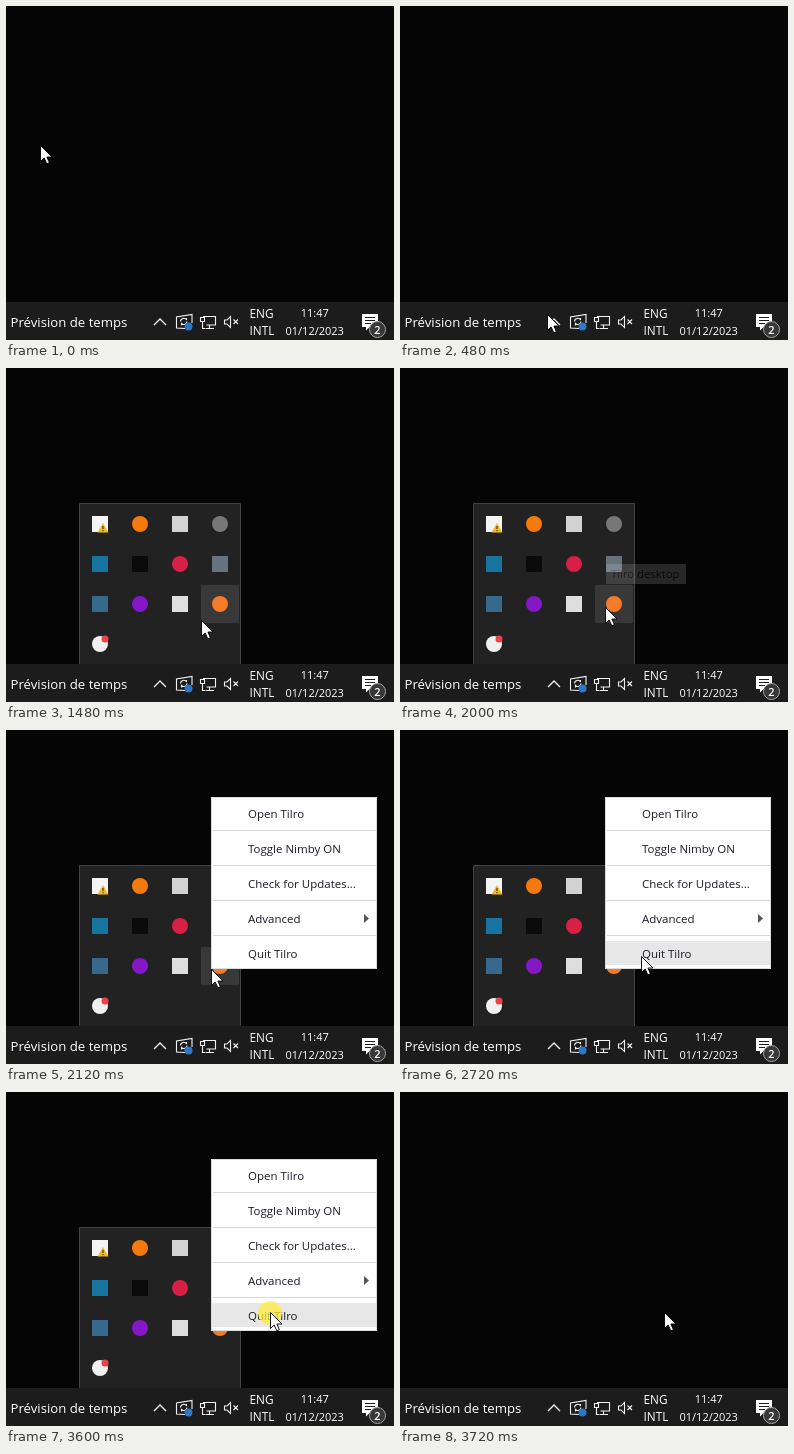
Recreate the animation shown at these times as an HTML page. Size 388 px wide and 334 px high, loop 3.88 s.

```html
<!DOCTYPE html>
<html lang="fr">
<head>
<meta charset="utf-8">
<title>Tray menu</title>
<style>
  html, body { margin: 0; width: 100%; height: 100%; overflow: hidden; background: #050505; }
  svg { display: block; width: 388px; height: 334px; font-family: "Open Sans", "Noto Sans", sans-serif; }
  .bar text { fill: #fff; font-weight: 500; }
  .glyph { fill: none; stroke: #f2f2f2; stroke-width: 1.1; }
  #menu text { font-size: 11.5px; fill: #1b1b26; }
</style>
</head>
<body>
<svg viewBox="0 0 388 334">
  <rect width="388" height="334" fill="#050505"/>

  <g class="bar">
    <rect y="296" width="388" height="38" fill="#1c1c1c"/>
    <rect id="chevronHover" x="142" y="296" width="24" height="38" fill="#353535"/>
    <text x="4.500" y="321" font-size="13.2">Prévision de temps</text>
    <g class="glyph">
      <path d="M148 319l6-6 6 6" stroke-width="1.4"/>
      <path d="M179 322.500l-8.500-.5V311l15.500-2.500V317"/>
      <path d="M174.500 315.500a3.200 3.200 0 0 1 6-1.500v-2M181 315.500a3.200 3.200 0 0 1-5.500 2v2"/>
      <path d="M197.500 312v-1.500h12v8.500h-9M203.500 319v3M200 322.500h8M194.500 311.500h4v4h-4zM196.500 315.500v7h3"/>
      <path d="M218.500 314h2.500l3.500-3.500v11l-3.500-3.500h-2.500zM227.500 313.500l4.500 4.500m0-4.500l-4.500 4.500"/>
    </g>
    <circle cx="182.500" cy="320.500" r="4" fill="#2b78c9"/>
    <text x="243.500" y="312" font-size="11.8">ENG</text>
    <text x="243.500" y="329" font-size="11.8">INTL</text>
    <g font-size="11" text-anchor="middle">
      <text x="308.700" y="311">11:47</text>
      <text x="308.700" y="328.500">01/12/2023</text>
      <path d="M356 308h16v13h-8.500l-3.500 3.500V321h-4z" fill="#fff"/>
      <path d="M359 311.500h10m-10 3h10m-10 3h6" stroke="#1c1c1c"/>
      <circle cx="371.500" cy="323.500" r="8" fill="#383838" stroke="#a5a5a5"/>
      <text x="371.500" y="327.500" style="font-weight: 600">2</text>
    </g>
  </g>

  <g id="tray">
    <path d="M73.500 296V135.500h161V296" fill="#222" stroke="#424242"/>
    <rect id="cellHover" x="195" y="217" width="38" height="38" fill="#383838"/>
    <g id="icons"></g>
  </g>

  <g id="tip">
    <rect x="206" y="196" width="80" height="20" fill="#f0f0f0"/>
    <text x="211" y="210" font-size="11.3" fill="#111">Tilro desktop</text>
  </g>

  <g id="menu">
    <rect x="205.500" y="67.500" width="165" height="171" fill="#fff" stroke="#dcdcdc"/>
    <rect id="itemHover" x="206" y="211" width="164" height="24" fill="#e7e7e7"/>
    <path d="M358 184l5 4.500-5 4.500z" fill="#555"/>
    <g id="items"></g>
  </g>

  <circle id="click" r="12" fill="#ffec3d" opacity=".75"/>
  <path id="cursor" d="M.5.5V16.500L4.200 13l2.600 5.800 2.600-1.100L6.900 12H12z" fill="#fff" stroke="#000" stroke-width=".9"/>
</svg>

<script>
const LOOP = 3880, TICK = 40;
const el = id => document.getElementById(id);

const disc = (x, y, color, r = 8) => `<circle cx="${x}" cy="${y}" r="${r}" fill="${color}"/>`;
const tile = (x, y, color) => `<rect x="${x - 8}" y="${y - 8}" width="16" height="16" fill="${color}"/>`;

const trayIcons = [
  [tile, '#f4f4f4'], [disc, '#f47a0c'], [tile, '#d2d2d2'], [disc, '#777'],
  [tile, '#16749f'], [tile, '#0b0b0b'], [disc, '#d81f45'], [tile, '#66727d'],
  [tile, '#37698f'], [disc, '#8417c6'], [tile, '#dedede'], [disc, '#f47b28'],
  [disc, '#f0f0f0']
];
el('icons').innerHTML = trayIcons.map(([shape, color], i) =>
  shape(94 + i % 4 * 40, 156 + Math.floor(i / 4) * 40, color)).join('') +
  '<path d="M97 155l5.500 9.500h-11z" fill="#f5b91c"/><path d="M97 158v3m0 1v1.200" stroke="#222"/>' +
  disc(99, 271, '#ed4245', 3.5);

const labels = ['Open Tilro', 'Toggle Nimby ON', 'Check for Updates...', 'Advanced', 'Quit Tilro'];
el('items').innerHTML = labels.map((label, i) => {
  const y = 88 + i * 35;
  const line = i < 4 ? `<path d="M207 ${y + 12.5}h163" stroke="#d7d7d7"/>` : '';
  return `${line}<text x="242" y="${y}">${label}</text>`;
}).join('');

const inOut = p => p < .5 ? 8 * p ** 4 : 1 - 8 * (1 - p) ** 4;
const out = p => 1 - (1 - p) ** 1.6;

// Each move: start, end, destination, easing
const home = [34, 139];
const moves = [
  [40, 600, [149, 311], inOut],
  [1160, 1680, [205, 239], inOut],
  [2440, 3000, [258, 220], out],
  [3040, 3200, [264, 220], out]
];

function cursorAt(t) {
  let pos = home;
  for (const [start, end, goal, ease] of moves) {
    if (t <= start) break;
    const p = ease(Math.min(1, (t - start) / (end - start)));
    pos = pos.map((v, i) => v + (goal[i] - v) * p);
  }
  return pos.map(Math.round);
}

const between = (t, a, b) => t >= a && t < b;
const show = (id, on) => { el(id).style.display = on ? '' : 'none'; };

function draw(t) {
  const [x, y] = cursorAt(t);
  el('cursor').setAttribute('transform', `translate(${x} ${y})`);
  el('click').setAttribute('transform', `translate(${x} ${y + 1})`);
  show('click', between(t, 680, 800) || between(t, 2040, 2120) || between(t, 3600, 3720));
  show('chevronHover', between(t, 560, 1320));
  show('tray', between(t, 880, 3720));
  show('cellHover', between(t, 1480, 2520));
  show('tip', between(t, 2000, 2120));
  el('tip').style.opacity = t < 2040 ? .15 : .6;
  show('menu', between(t, 2120, 3720));
  show('itemHover', t >= 2520);
}

const begin = performance.now();
function frame() {
  const t = (performance.now() - begin) % LOOP;
  draw(Math.floor(t / TICK) * TICK);
  requestAnimationFrame(frame);
}
frame();
</script>
</body>
</html>
```
